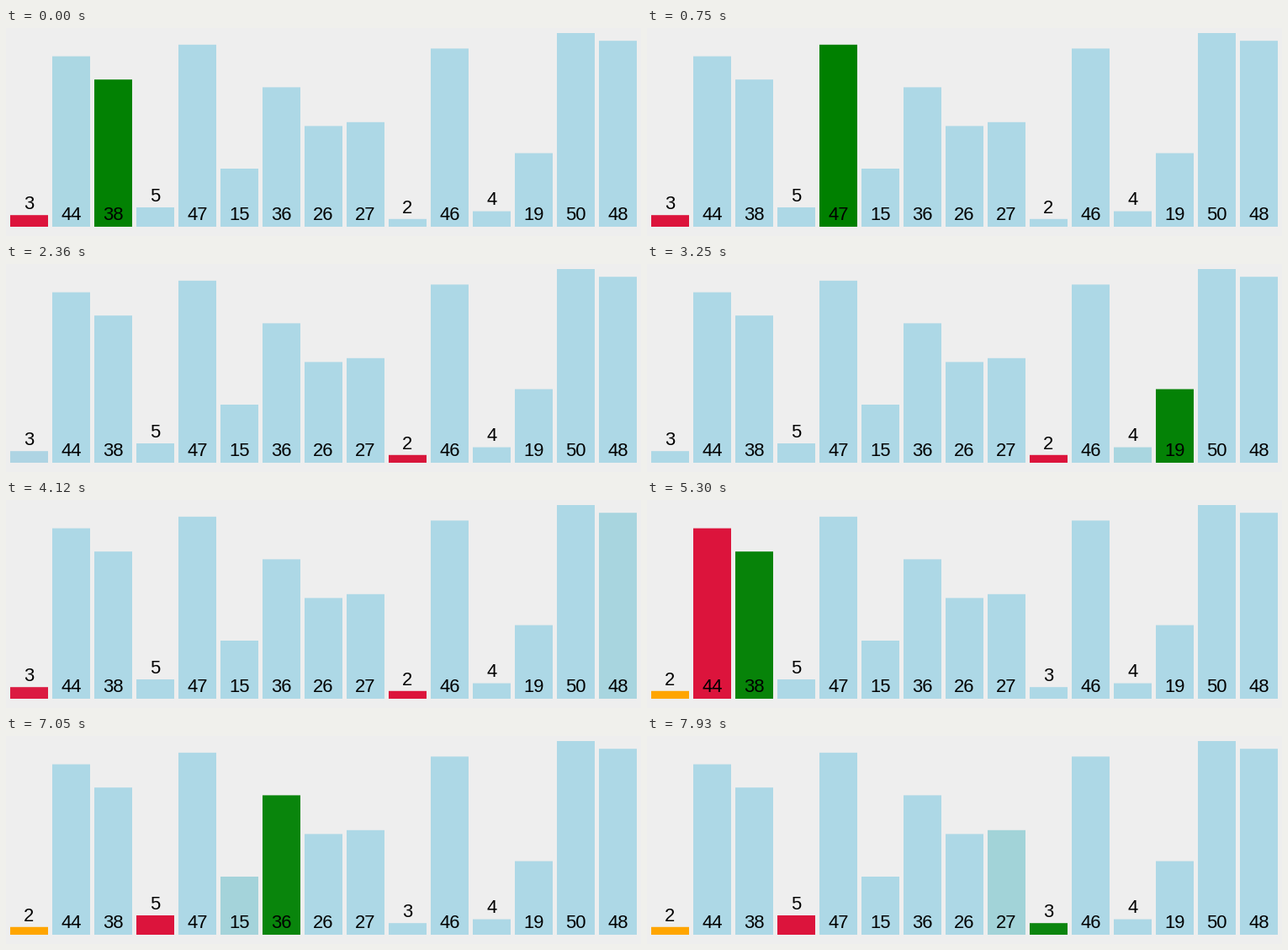
Write a matplotlib script that moves like this. It is 755x247 px and loops after 8000 ms.

```python
import numpy as np
import matplotlib.pyplot as plt
from matplotlib.animation import FuncAnimation
from matplotlib.colors import to_rgb
from matplotlib.patches import Rectangle

W, H, DPI = 755, 247, 100
LOOP, INTERVAL = 8000, 20
TICK, LEAD = 146.9, 16            # the picture refreshes once per tick (ms)
STEP, FADE, START = 294.4, 150, -129

VALUES = [3, 44, 38, 5, 47, 15, 36, 26, 27, 2, 46, 4, 19, 50, 48]
BASE, UNIT, PITCH, BAR = 236, 4.6, 50, 45
FONT_PX = 22

IDLE, LOWEST, SCAN, DONE = map(
    to_rgb, ("lightblue", "crimson", "green", "orange"))


def selection_sort(values):
    """Yield {value: (slot, colour)} for every step of the sort."""
    a = list(values)

    def state(done, lows=(), scan=None):
        colours = [DONE if s < done else IDLE for s in range(len(a))]
        if scan is not None:
            colours[scan] = SCAN
        for s in lows:
            colours[s] = LOWEST
        return {v: (s, np.array(colours[s])) for s, v in enumerate(a)}

    for i in range(len(a) - 1):
        low = i
        yield state(i, [low])
        for j in range(i + 1, len(a)):
            yield state(i, [low], j)
            if a[j] < a[low]:
                low = j
                yield state(i, [low])
        yield state(i, [i, low])
        a[i], a[low] = a[low], a[i]
        yield state(i, [i, low])
        yield state(i + 1)


STATES = list(selection_sort(VALUES))
FIRST = 2                          # the loop opens on the third step


def ease(u):
    u = min(max(u, 0), 1)
    return 4 * u**3 if u < 0.5 else 1 - 4 * (1 - u)**3


def label_y(value):
    height = value * UNIT
    return BASE - 8 if height > 40 else BASE - height - 7.3


fig = plt.figure(figsize=(W / DPI, H / DPI), dpi=DPI, facecolor="#eeeeee")
ax = fig.add_axes([0, 0, 1, 1])
ax.set(xlim=(0, W), ylim=(H, 0))
ax.axis("off")

bars, labels = {}, {}
for v in VALUES:
    bars[v] = ax.add_patch(Rectangle((0, BASE - v * UNIT), BAR, v * UNIT,
                                     linewidth=0, snap=False))
    labels[v] = ax.text(0, label_y(v), str(v), ha="center", va="baseline",
                        family="Liberation Sans", color="black",
                        fontsize=FONT_PX * 72 / DPI)


def draw(frame):
    t = (frame * INTERVAL + LEAD) // TICK * TICK
    step, since = divmod(t - START, STEP)
    p = ease(since / FADE)
    before, after = STATES[FIRST + int(step) - 1], STATES[FIRST + int(step)]
    for v in VALUES:
        (s0, c0), (s1, c1) = before[v], after[v]
        x = 5 + PITCH * (s0 + (s1 - s0) * p)
        bars[v].set_x(x)
        bars[v].set_facecolor(c0 + (c1 - c0) * p)
        labels[v].set_x(x + BAR / 2)
    return [*bars.values(), *labels.values()]


anim = FuncAnimation(fig, draw, frames=LOOP // INTERVAL, interval=INTERVAL,
                     repeat=True, repeat_delay=0)
plt.show()
```
